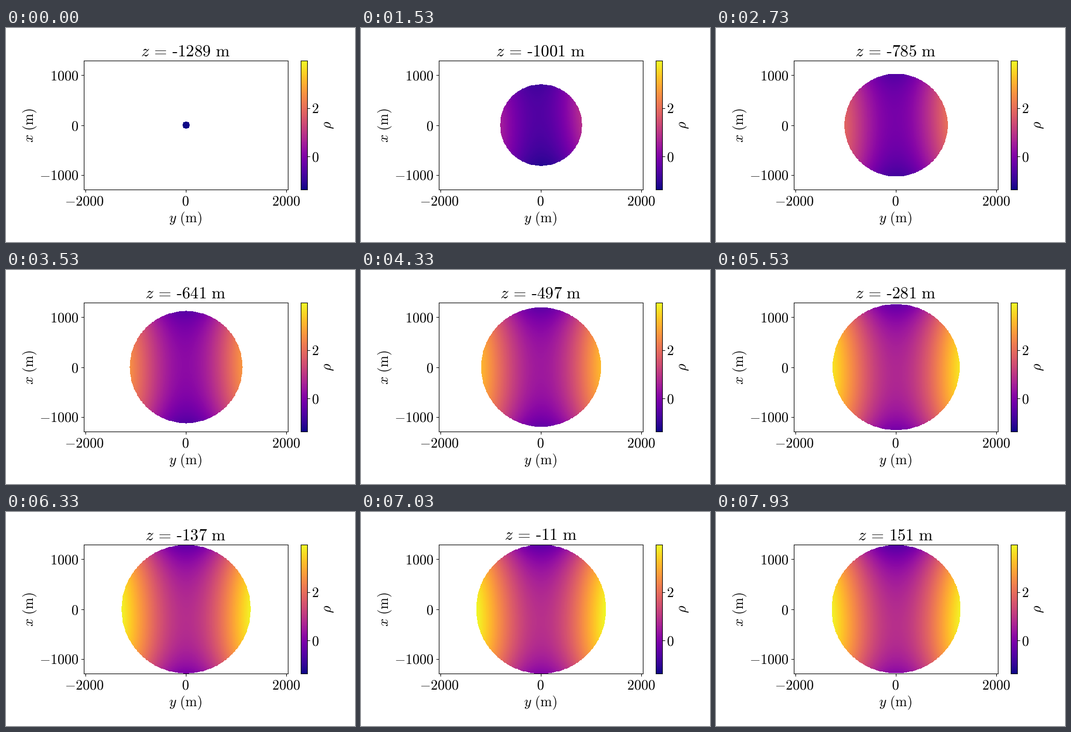
Write a matplotlib script that moves like this. It is 650x400 px and loops after 8000 ms.

```python
import numpy as np
import matplotlib.pyplot as plt
from matplotlib.animation import FuncAnimation

W, H, DPI = 650, 400, 100
LOOP, INTERVAL = 8000, 20
RADIUS, CELL = 1291, 9
Z_START, Z_STEP = -1289, 18
VMIN, VMAX = -1.37, 3.956
LABEL, TITLE = 18.8, 22.2

plt.rcParams["mathtext.fontset"] = "cm"
fig = plt.figure(figsize=(W / DPI, H / DPI), dpi=DPI, facecolor="white")


def add_axes(left, top, right, bottom):
    """Axes placed by pixel edges measured from the top left."""
    ax = fig.add_axes([left / W, 1 - bottom / H, (right - left) / W, (bottom - top) / H])
    ax.tick_params(labelleft=False, labelbottom=False, labelright=False)
    return ax


def put(x, y, text, size=LABEL, ha="center", rotation=0):
    return fig.text(x / W, 1 - y / H, text, fontsize=size, ha=ha, va="baseline",
                    rotation=rotation, rotation_mode="anchor")


# Cell centres of the slice, in metres
half = 144 * CELL
centres = np.arange(-half + CELL / 2, half, CELL)
Y, X = np.meshgrid(centres, centres)


def density(z):
    """Density on the slice at height z, masked outside the sphere."""
    x, y, h = X / 1290, Y / 1290, z / 1290
    rho = (0.85 - 2.9 * h**2 + 0.7 * h**4
           + 4.6 * y**2 - 1.5 * y**4 - y**2 * h**2
           - 0.7 * x**2 - 0.4 * x**4
           - x * (0.3 + 0.7 * h) - (0.5 + 1.2 * x) * y * h**3)
    return np.ma.masked_where(X**2 + Y**2 + z**2 > RADIUS**2, rho)


ax = add_axes(145, 61, 525, 302)
image = ax.imshow(density(Z_START), cmap="plasma", vmin=VMIN, vmax=VMAX,
                  extent=[-half, half, -half, half], origin="lower",
                  aspect="auto", interpolation="nearest")
ax.set(xlim=(-2032, 2032), ylim=(-1289, 1289),
       xticks=[-2000, 0, 2000], yticks=[-1000, 0, 1000])

bar = add_axes(549, 61, 561, 302)
bar.imshow(np.linspace(VMIN, VMAX, 256)[:, None], cmap="plasma", origin="lower",
           extent=[0, 1, VMIN, VMAX], aspect="auto")
bar.yaxis.tick_right()
bar.tick_params(labelright=False)
bar.set(xticks=[], yticks=[0, 2])

for x, value in ((146, -2000), (334, 0), (521.5, 2000)):
    put(x, 331, f"${value}$")
for y, value in ((98, 1000), (191, 0), (284, -1000)):
    put(135, y, f"${value}$", ha="right")
for y, value in ((159, 2), (249, 0)):
    put(569, y, f"${value}$", ha="left")
put(333.5, 363, r"$y\ \mathrm{(m)}$")
put(51, 181.5, r"$x\ \mathrm{(m)}$", rotation=90)
put(606, 181.5, r"$\rho$", rotation=90)
title = put(334.5, 52.5, "", TITLE)


def update(frame):
    # The first slice is held only briefly, then one step every 100 ms
    step = (frame * INTERVAL + 80) // 100
    z = Z_START + Z_STEP * step
    image.set_data(density(z))
    # \text keeps the sign a short hyphen
    title.set_text(rf"$z\,=\,\text{{{z}}}\ \mathrm{{m}}$")
    return image, title


anim = FuncAnimation(fig, update, frames=LOOP // INTERVAL, interval=INTERVAL,
                     repeat=True, repeat_delay=0)
plt.show()
```
